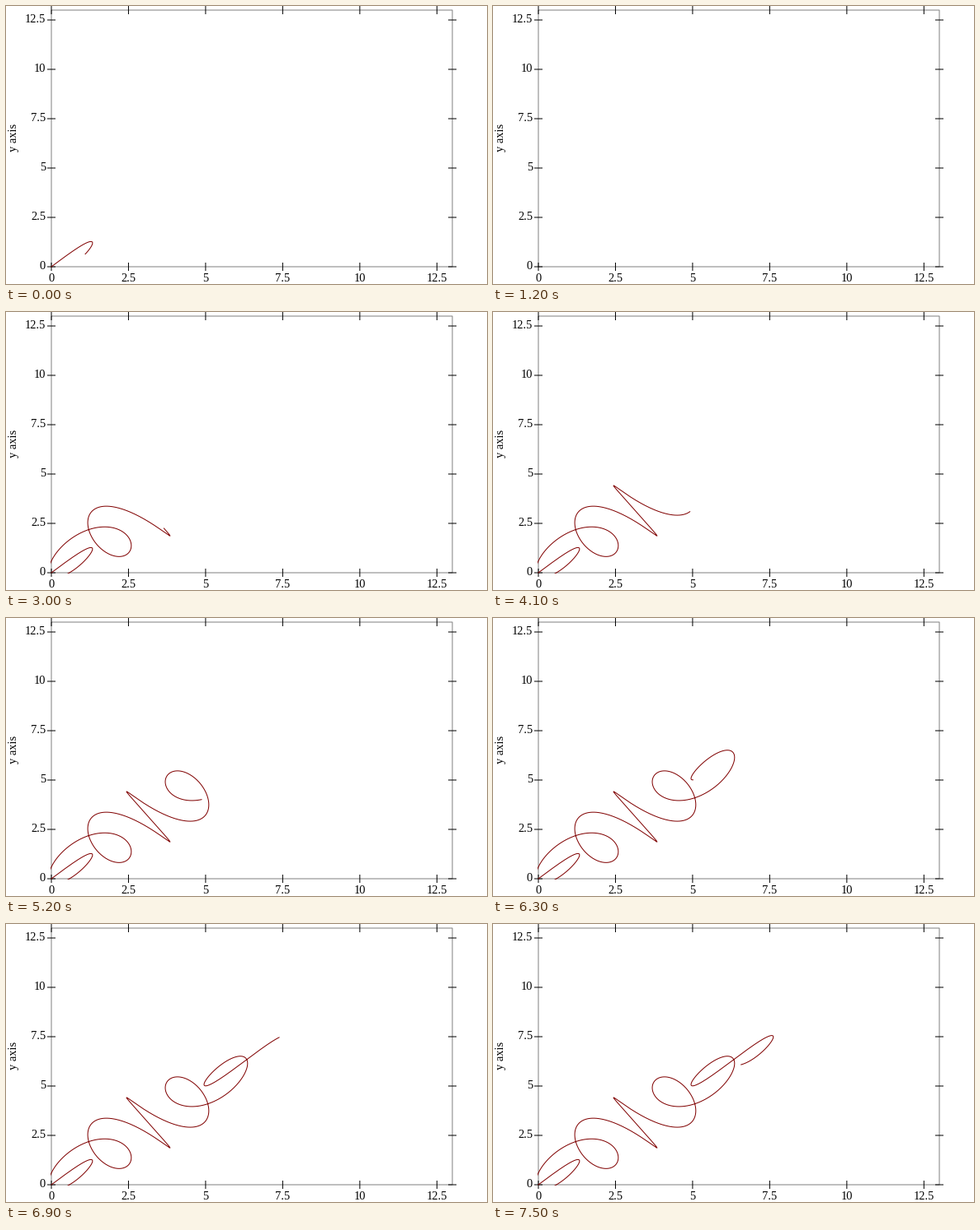
Animation of 583 by 338 pixels, one loop 8000 ms. Source, as a matplotlib script:

```python
import numpy as np
import matplotlib.pyplot as plt
from matplotlib.animation import FuncAnimation
from matplotlib.patches import Rectangle

W, H, DPI = 583, 338, 100
PX = 72 / DPI                      # one pixel in points
LEFT, TOP, RIGHT, BOTTOM = 55, 5, 541, 317
SPAN = 13
TICKS = np.arange(0, SPAN, 2.5)
STEP_MS = 100

# Time step at which the curve grows to each new length
GROW = np.array([0, 6, 13, 18, 24, 30, 35, 41, 46, 52, 58, 63, 69, 75])
# Half-finished redraws: number of tick labels present (None = empty stage)
REDRAW = {5: 2, 12: 12, 23: 2, 29: 8, 57: 12, 68: None, 74: 2}


def to_x(v):
    return LEFT + v * (RIGHT - LEFT) / SPAN


def to_y(v):
    return BOTTOM - v * (BOTTOM - TOP) / SPAN


def curve_points(end):
    t = np.linspace(0, end, int(end * 200) + 1)
    return to_x(t + np.sin(5 * t)), to_y(t + np.sin(6 * t))


plt.rcParams["font.family"] = "Liberation Serif"
plt.rcParams["toolbar"] = "None"
fig = plt.figure(figsize=(W / DPI, H / DPI), dpi=DPI, facecolor="white")
ax = fig.add_axes([0, 0, 1, 1])
ax.set_xlim(0, W)
ax.set_ylim(H, 0)
ax.axis("off")


def line(xs, ys, color="black"):
    # Unsnapped, so lines between two pixels stay soft
    ax.plot(xs, ys, color=color, lw=PX, solid_capstyle="butt",
            snap=False, zorder=2)


def label(x, y, text, **kw):
    return ax.text(x, y, text, fontsize=14.4 * PX, va="baseline", **kw)


line([LEFT, RIGHT, RIGHT, LEFT, LEFT], [TOP, TOP, BOTTOM, BOTTOM, TOP], "#808080")
for v in TICKS:
    for edge in (TOP, BOTTOM):
        line([to_x(v)] * 2, [edge - 5, edge + 5])
    for edge in (LEFT, RIGHT):
        line([edge - 5, edge + 5], [to_y(v)] * 2)

label(12.6, 160, "y axis", ha="center", rotation=90, rotation_mode="anchor")
labels = [label(to_x(v), 335, f"{v:g}", ha="center") for v in TICKS]
labels += [label(48, to_y(v) + 3, f"{v:g}", ha="right") for v in TICKS]

curve, = ax.plot([], [], color="#800000", lw=PX, snap=False, zorder=3)
curve.set_clip_path(Rectangle((LEFT - 1, TOP - 1), RIGHT - LEFT + 2,
                              BOTTOM - TOP + 2, transform=ax.transData))


def update(i):
    redrawing = i in REDRAW
    shown = REDRAW.get(i, len(labels))
    ax.set_visible(shown is not None)
    for n, text in enumerate(labels):
        text.set_visible(n < (shown or 0))
    curve.set_visible(not redrawing)
    curve.set_data(*curve_points(0.5 * np.sum(GROW <= i)))
    return [curve, *labels]


anim = FuncAnimation(fig, update, frames=80, interval=STEP_MS,
                     repeat=True, repeat_delay=0, blit=False)
plt.show()
```
